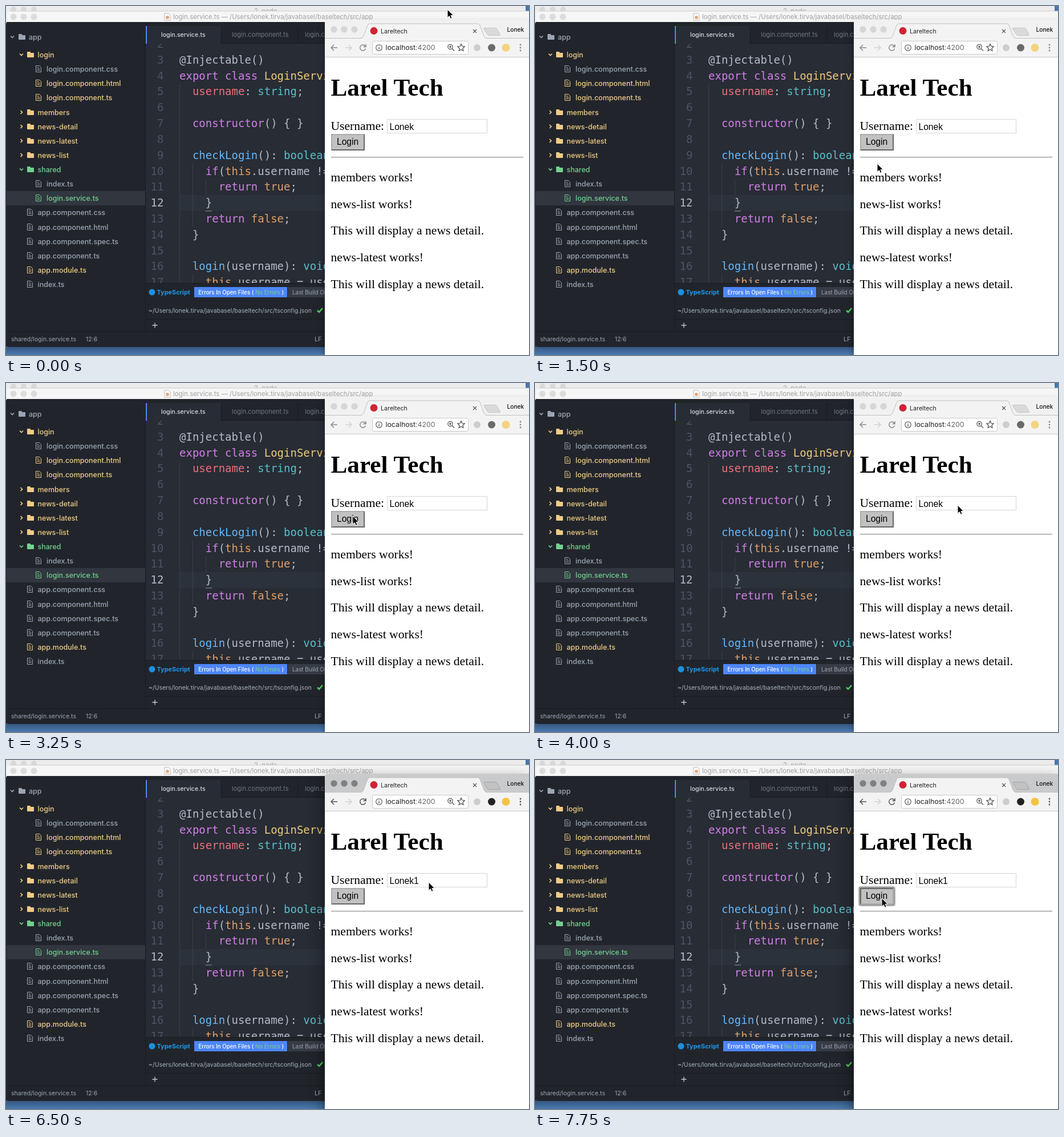
Write an HTML page that moves like this. It is 917 by 611 pixels and loops after 8000 ms.

```html
<!DOCTYPE html>
<html lang="en">
<head>
<meta charset="utf-8">
<title>Editor and browser</title>
<style>
  html, body { margin: 0; width: 100%; height: 100%; overflow: hidden; background: #fff; }
  svg { display: block; width: 917px; height: 611px; }
  text { white-space: pre; font-family: Inter, Roboto, sans-serif; }
  .code { font: 19px "DejaVu Sans Mono", monospace; }
  .tree { font-size: 12.5px; font-weight: 500; }
  .serif { font-family: "Liberation Serif", serif; font-size: 21.6px; }
  .heading { font-size: 43.2px; font-weight: 700; }
  .arial { font: 15.6px "Liberation Sans", sans-serif; }
</style>
</head>
<body>
<svg id="stage" viewBox="0 0 917 611"></svg>
<script>
const GREY = '#9da5b4', YELLOW = '#f0cb86', GREEN = '#73d08f', DARK = '#21252b', EDGE = '#181a1f';
const INK = { w: '#b4bbc8', p: '#cf80e6', y: '#edc97f', r: '#e9707a', c: '#5abfcb', b: '#66b7f7', o: '#dda06a' };

const rect = (x, y, w, h, fill, more = '') =>
  `<rect x="${x}" y="${y}" width="${w}" height="${h}" fill="${fill}" ${more}/>`;
const text = (x, y, size, fill, s, more = '') =>
  `<text x="${x}" y="${y}" font-size="${size}" fill="${fill}" ${more}>${s}</text>`;
const styled = (x, y, fill, s, name) =>
  `<text x="${x}" y="${y}" fill="${fill}" class="${name}">${s}</text>`;
const dot = (x, y, r, fill, more = '') =>
  `<circle cx="${x}" cy="${y}" r="${r}" fill="${fill}" ${more}/>`;
const line = (d, stroke, w = 1, more = '') =>
  `<path d="${d}" fill="none" stroke="${stroke}" stroke-width="${w}" ${more}/>`;
const shape = (d, fill, more = '') => `<path d="${d}" fill="${fill}" ${more}/>`;
const lights = (x, y, r, fill) => [0, 18, 36].map(dx => dot(x + dx, y, r, fill)).join('');

const fileIcon = (x, y, c) =>
  line(`M${x + .5} ${y - 5.5}h6l3 3v8h-9zM${x + 2.5} ${y - 2.5}h3m-3 2.5h5m-5 2.5h5`, c);
const folderIcon = (x, y, c) =>
  shape(`M${x} ${y - 4}q0-1 1-1h4q1 0 1 1v1h5q1 0 1 1v6q0 1-1 1h-10q-1 0-1-1z`, c);
const chevron = (x, y, open, c) =>
  line(open ? `M${x - 3} ${y - 1.5}l3 3 3-3` : `M${x - 1.5} ${y - 3}l3 3-3 3`, c, 1.7);

function desktop() {
  return rect(0, 0, 917, 611, '#4478b1') +
    rect(0, 592, 917, 19, 'url(#under)') +
    rect(0, 0, 911, 30, '#ececec') +
    lights(13, 6, 5, '#d9d9d9') +
    text(435, 13, 11.3, '#a5a5a5', '2. node') +
    rect(0, 30, 2, 566, '#16282c');
}

function tree() {
  // kind: o = open folder, f = closed folder, 1 and 2 = file depth
  const rows = [
    ['o', YELLOW, 'login'], ['2', GREY, 'login.component.css'], ['2', YELLOW, 'login.component.html'],
    ['2', YELLOW, 'login.component.ts'], ['f', YELLOW, 'members'], ['f', YELLOW, 'news-detail'],
    ['f', YELLOW, 'news-latest'], ['f', YELLOW, 'news-list'], ['o', GREEN, 'shared'],
    ['2', GREY, 'index.ts'], ['2', GREEN, 'login.service.ts'], ['1', GREY, 'app.component.css'],
    ['1', GREY, 'app.component.html'], ['1', GREY, 'app.component.spec.ts'], ['1', GREY, 'app.component.ts'],
    ['1', YELLOW, 'app.module.ts'], ['1', GREY, 'index.ts']
  ];
  let out = rect(1, 28, 244, 542, DARK) + rect(1, 324, 243, 25, '#31363f') +
    chevron(11, 54, true, GREY) + folderIcon(22, 54, GREY) + styled(40, 58.5, GREY, 'app', 'tree');
  rows.forEach(([kind, color, name], i) => {
    const y = Math.round(85 + 25.13 * i), deep = kind === '2';
    const folder = kind === 'o' || kind === 'f';
    if (folder) out += chevron(27, y, kind === 'o', color);
    out += folder ? folderIcon(37, y, color) : fileIcon(deep ? 52 : 37, y, color);
    out += styled(deep ? 71 : 55.5, y + 4.5, color, name, 'tree');
  });
  return out;
}

function code() {
  // each part starts with its ink letter
  const lines = {
    3: [0, 'w@Injectable()'],
    4: [0, 'pexport class |yLoginService'],
    5: [2, 'rusername|w: |cstring|w;'],
    7: [2, 'pconstructor|w() { }'],
    9: [2, 'bcheckLogin|w(): |cboolean'],
    10: [4, 'pif|w(|othis|w.username !='],
    11: [6, 'preturn |otrue|w;'],
    12: [4, 'w}'],
    13: [4, 'preturn |ofalse|w;'],
    14: [2, 'w}'],
    16: [2, 'blogin|w(username): |cvoid'],
    17: [4, 'othis|w.username = use']
  };
  let out = rect(245, 66, 320, 420, '#282c34') + rect(304, 331, 261, 28, '#2c323c') +
    line('M304.5 137V485M327.5 276V387M327.5 470V485M350.5 304V331', '#3a3f49');
  for (let n = 2; n <= 17; n++) {
    const y = 100.8 + (n - 3) * 27.82;
    out += text(276.5, y, 19, n === 12 ? INK.w : '#4b5364', n, 'class="code" text-anchor="end"');
    if (!lines[n]) continue;
    const [indent, parts] = lines[n];
    const spans = parts.split('|').map(p => `<tspan fill="${INK[p[0]]}">${p.slice(1)}</tspan>`).join('');
    out += styled(304 + indent * 11.44, y, INK.w, spans, 'code');
  }
  return out + rect(350, 358.5, 11, 1, '#8c93a0');
}

function editor() {
  const path = '/Users/lonek.tirva/javabasel/baseltech/src/';
  return shape('M1 30V14q0-5 5-5H917V30z', '#f6f6f6') +
    rect(6, 8.5, 911, 1, '#cfcfcf') + lights(13, 19, 5.5, '#dcdcdc') +
    shape('M278 13h7l3 3v9h-10z', '#fff', 'stroke="#b9b9b9"') + dot(283, 20, 3, '#e3a878') +
    text(293, 23.3, 11.35, '#a0a0a0', `login.service.ts — ${path}app`) +
    tree() + code() +
    rect(245, 28, 320, 38, DARK) + rect(245, 35, 132, 31, '#282c34') + rect(245, 35, 2, 31, '#568af2') +
    rect(244, 28, 1, 542, EDGE) + rect(377, 35, 1, 31, EDGE) + rect(511, 35, 1, 31, EDGE) +
    rect(377, 65, 188, 1, EDGE) +
    text(272, 54, 10.6, '#d7dae0', 'login.service.ts', 'font-weight="500"') +
    text(396, 54, 11, '#6f7684', 'login.component.ts') +
    text(524, 54, 11, '#6f7684', 'login.component.html') +
    rect(245, 485, 320, 85, DARK) + rect(245, 485, 320, 1, EDGE) +
    dot(256, 501, 5.5, '#1d8fe0') +
    text(264.5, 505, 10.9, '#2196e8', 'TypeScript', 'font-weight="700"') +
    rect(330, 492, 163, 18, '#4d86f7') +
    text(337.5, 504.5, 9.7, '#fff', 'Errors In Open Files ( <tspan fill="#73c990">No Errors</tspan> )', 'font-weight="500"') +
    rect(494, 492, 71, 18, '#363b45') + text(502, 504.5, 9.9, GREY, 'Last Build Output') +
    text(250, 536.5, 10.55, '#a8b0be', `~${path}tsconfig.json`) +
    line('M546 533l3 3 6-7', '#4fd05f', 2.5) +
    rect(245, 548, 320, 1, EDGE) + line('M256.5 559h9m-4.5-4.5v9', '#c5cad3', 1.3) +
    shape('M1 570H917V597H6q-5 0-5-5z', DARK) + rect(1, 569.5, 916, 1, EDGE) +
    text(9, 587, 10.6, GREY, 'shared/login.service.ts') +
    text(140, 587, 10.6, GREY, '12:6') + text(541, 587, 10.6, GREY, 'LF');
}

function chrome() {
  const frame = 'M559 611V29q0-5 5-5H917V611z';
  const tab = 'M622 56.5q4-1 5-4l7-18.5q1-3 4-3H827q3 0 4 3l7 18.5q1 3 5 4';
  const shadow = (id, css) => shape(frame, '#fff', `id="${id}" style="filter:drop-shadow(${css})"`);
  return shadow('softShadow', '0 6px 6px rgba(0,0,0,.35)') + shadow('deepShadow', '0 12px 14px rgba(0,0,0,.55)') +
    shape('M559 58V29q0-5 5-5H917V58z', '#f1f1f1', 'id="strip"') +
    `<g id="lights">${lights(575, 41, 5.7, 'currentColor')}</g>` +
    shape('M838 38.5h20q2 0 3 2l5 9q1 2-1 2h-18q-2 0-3-2l-6-9q-1-2 0-2z', '#dadada', 'id="newTab" stroke="#bdbdbd"') +
    rect(559, 56, 358, 34, '#f3f3f3') + line('M559 56.5H624M842 56.5H917', '#c3c3c3') +
    shape(tab, '#f3f3f3') + line(tab, '#c0c0c0') +
    dot(645, 43.5, 6.5, '#cf2434') + text(657, 48, 10.7, '#222', 'Lareltech') +
    line('M819 41l6 6m0-6l-6 6', '#555', 1.2) +
    text(878.5, 45, 10.2, '#111', 'Lonek', 'font-weight="500"') +
    `<g id="tools">` +
      line('M581 73h-11m5-5l-5 5 5 5', '#555', 1.5) +
      line('M630 70.5a5 5 0 1 0 .5 4M631 67v4.5h-4.5', '#555', 1.5) +
      dot(851.5, 73, 6.5, '#222') + dot(876.5, 73, 7, '#f2c443') +
      dot(902, 68, 1.4, '#555') + dot(902, 73, 1.4, '#555') + dot(902, 78, 1.4, '#555') +
    `</g>` +
    line('M595 73h11m-5-5l5 5-5 5', '#d2d2d2', 1.5) + dot(826, 73, 6, '#cdcdcd') +
    rect(642.5, 61.5, 168, 23, '#fff', 'rx="3" stroke="#c9c9c9"') +
    dot(654, 73, 5.3, 'none', 'stroke="#555" stroke-width="1.1"') + line('M654 72v4M654 69.5v1.3', '#555', 1.3) +
    text(665.5, 77.3, 12.3, '#222', 'localhost<tspan fill="#666">:4200</tspan>') +
    dot(779, 71.5, 4.2, 'none', 'stroke="#555" stroke-width="1.2"') +
    line('M782 74.5l4 4M777 71.5h4m-2-2v4', '#555', 1.3) +
    line('M798 66.5l1.8 4 4.4.5-3.3 3 .9 4.4-3.8-2.2-3.8 2.2.9-4.4-3.3-3 4.4-.5z', '#444', 1.2) +
    rect(559, 89, 358, 1, '#cacaca');
}

function page() {
  const paragraphs = ['members works!', 'news-list works!', 'This will display a news detail.',
    'news-latest works!', 'This will display a news detail.'];
  return rect(559, 90, 358, 521, '#fff') +
    styled(569.5, 157, '#000', 'Larel Tech', 'serif heading') +
    styled(569.5, 216.5, '#000', 'Username:', 'serif') +
    rect(668.5, 198.5, 175, 24, '#fff', 'stroke="#d6d6d6"') +
    styled(672.5, 217, '#000', 'Lonek<tspan id="typed">1</tspan>', 'arial') +
    rect(568, 222, 63, 33, '#999', 'id="ring" rx="3" style="filter:drop-shadow(0 0 1.5px #777)"') +
    rect(570, 224, 59, 29, '#c1c1c1') +
    shape('M570 253V224H629L627 226H572V251z', '#aaa', 'id="edgeTop"') +
    shape('M570 253H629V224L627 226V251H572z', '#666', 'id="edgeBottom"') +
    styled(580, 243.3, '#000', 'Login', 'arial') +
    rect(570, 264, 337, 1, '#8f8f8f') + rect(570, 265, 337, 1, '#e6e6e6') +
    paragraphs.map((p, i) => styled(569.5, 307 + 46.65 * i, '#000', p, 'serif')).join('');
}

const $ = id => document.getElementById(id);
$('stage').innerHTML =
  `<defs><linearGradient id="under" x2="0" y2="1"><stop stop-color="#2f4c70"/><stop offset="1" stop-color="#4a7ab0"/></linearGradient></defs>` +
  desktop() + editor() + chrome() + page() +
  shape('M0 0V14.5L3.3 11.4 5.5 16.3 8 15.2 5.9 10.4H10.3z', '#000', 'id="cursor" stroke="#fff" stroke-width="1"');

const LOOP = 8000, STEP = 250;
// time, x, y of the pointer tip
const pointer = [
  [0, 774, 6], [250, 757, 36], [500, 721, 95], [750, 676, 163], [1000, 635, 220], [1250, 609, 253],
  [1500, 600, 276], [1750, 680, 205], [2000, 790, 121], [2250, 735, 165], [2500, 640, 235],
  [2750, 573, 274], [3000, 592, 252], [3250, 608, 233], [3750, 651, 212], [4000, 741, 214],
  [6750, 735, 219], [7000, 714, 231], [7250, 688, 246], [7500, 640, 243], [7750, 608, 242]
];

function draw(now) {
  const t = Math.floor((now % LOOP) / STEP) * STEP;
  const [, x, y] = pointer.filter(p => p[0] <= t).pop();
  const active = t >= 5500, pressed = t >= 7750;
  const show = (id, on) => $(id).style.visibility = on ? 'visible' : 'hidden';
  const fill = (id, color) => $(id).setAttribute('fill', color);
  $('cursor').setAttribute('transform', `translate(${x} ${y})`);
  show('softShadow', !active);
  show('deepShadow', active);
  show('typed', t >= 6250);
  show('ring', pressed);
  fill('strip', active ? '#c9cacc' : '#f1f1f1');
  fill('newTab', active ? '#c2c2c2' : '#dadada');
  $('newTab').setAttribute('stroke', active ? '#a4a4a4' : '#c6c6c6');
  $('lights').style.color = active ? '#808080' : '#d6d6d6';
  $('tools').style.opacity = active ? 1 : .65;
  fill('edgeTop', pressed ? '#666' : '#aaa');
  fill('edgeBottom', pressed ? '#aaa' : '#666');
}

const start = performance.now();
function tick() {
  draw(performance.now() - start);
  requestAnimationFrame(tick);
}
tick();
</script>
</body>
</html>
```
